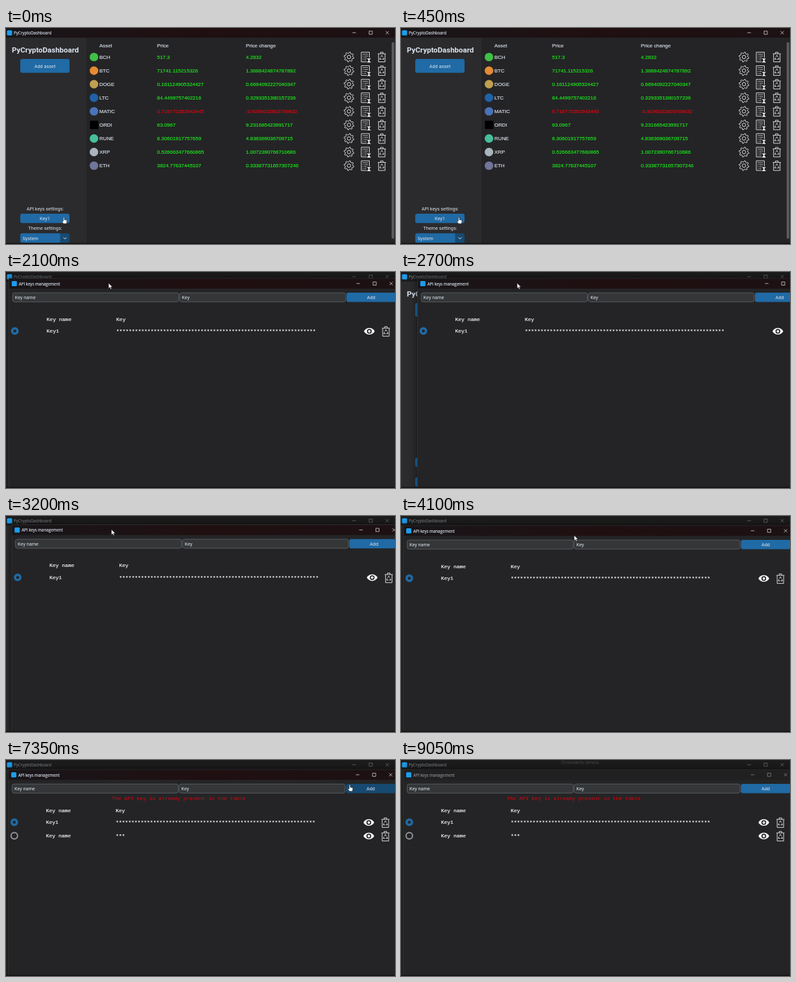
Animation, 600 px wide and 335 px high, one loop 9100 ms. Source, as an HTML page:

```html
<!DOCTYPE html>
<html lang="en">
<head>
<meta charset="utf-8">
<title>PyCryptoDashboard</title>
<style>
  html, body { margin: 0; width: 100%; height: 100%; overflow: hidden; background: #242426; }
  svg { display: block; width: 100vw; height: 100vh; }
  text { fill: #dce4ee; white-space: pre; }
  .ui { font: 7.3px Roboto, sans-serif; }
  .bar { font: 6.2px "Open Sans", sans-serif; stroke: #dce4ee; stroke-width: .15; }
  .cell { font: 7.9px "Liberation Sans", Arial, sans-serif; stroke: #dce4ee; stroke-width: .15; }
  .mono { font: 8.02px "Liberation Mono", "Courier New", monospace; fill: #fff; stroke: #fff; stroke-width: .15; }
  .cell.up { fill: #1cf01c; stroke: #1cf01c; }
  .cell.down { fill: #e8000c; stroke: #e8000c; }
  .mono.error { fill: #e4000b; stroke: none; }
  .bar.tip { fill: #4b4b4d; stroke: none; }
  .head { font: bold 11.5px Roboto, sans-serif; }
  .mid { text-anchor: middle; }
  .line { fill: none; stroke: #eee; stroke-width: .9; stroke-linejoin: round; }
  .thin { fill: none; stroke: #eee; stroke-width: .7; }
  .solid { fill: #eee; }
  .hand { fill: #fff; stroke: #222; stroke-width: .6; stroke-linejoin: round; }
</style>
</head>
<body>
<svg id="stage" viewBox="0 0 600 335" xmlns="http://www.w3.org/2000/svg"></svg>
<script>
const LOOP = 9100;
const BLUE = '#206aa5', DARK_BLUE = '#174a71';
const OPEN = 650, GRAB = 1680, HOVER_IN = 4500, ROW_ADDED = 5500,
      ERROR_AT = 6300, HOVER_OUT = 7500, BLUR = 8700, TIP = 8850;

const assets = [
  ['BCH', '517.3', '4.2832', '#3fbf45'],
  ['BTC', '71741.115215326', '1.3688424874787892', '#e58a35'],
  ['DOGE', '0.161124905324427', '0.6694092227040347', '#bfa050'],
  ['LTC', '84.4499757402216', '0.3293351380157236', '#1f62a8'],
  ['MATIC', '0.718772352943445', '-0.9296032803789832', '#4a72b8'],
  ['ORDI', '63.0967', '9.231685423991717', '#000'],
  ['RUNE', '6.30601917757659', '4.838369036709715', '#45c09a'],
  ['XRP', '0.526663477660865', '1.0072390766710686', '#a9b4bd'],
  ['ETH', '3824.77637445107', '0.33387731657307246', '#70759a'],
];

// Markup helpers; text is placed by its vertical centre.
const text = (x, y, s, cls, extra = '') =>
  `<text x="${x}" y="${y + 2.7}" class="${cls}" ${extra}>${s}</text>`;
const rect = (x, y, w, h, fill, extra = '') =>
  `<rect x="${x}" y="${y}" width="${w}" height="${h}" fill="${fill}" ${extra}/>`;
const at = (x, y, inner) => `<g transform="translate(${x} ${y})">${inner}</g>`;
const path = (d, cls) => `<path d="${d}" class="${cls}"/>`;

function gear() {
  const points = [];
  for (let i = 0; i < 32; i++) {
    const a = (i + .5) * Math.PI / 16, r = i % 4 < 2 ? 7.6 : 5.7;
    points.push((r * Math.cos(a)).toFixed(2) + ',' + (r * Math.sin(a)).toFixed(2));
  }
  return `<polygon points="${points.join(' ')}" class="line"/><circle r="2.7" class="line"/>`;
}
const list = () =>
  path('M2 7.5H-6.5V-7.5H6V1', 'line') +
  path('M-4.5 -4.5H4M-4.5 -1.5h1.3M-2 -1.5H4M-4.5 1.5h1.3M-2 1.5H2M-4.5 4.5h1.3M-2 4.5H1', 'thin') +
  path('M2.6 2.2H8V3H7.4L5.8 5.2L7.4 7.6H8V8.5H2.6V7.6H3.2L4.8 5.2L3.2 3H2.6Z', 'solid');
const trash = () =>
  path('M-5 -4.8V7.5H5V-4.8M-6.2 -5H6.2M-2 -5V-7.3H2V-5', 'line') +
  path('M-1.6 -.2L0 -2.6L1.6 -.2M2.2 1L3.3 3.5H.6M-.6 3.5H-3.3L-2.2 1', 'line');
const eye = () =>
  '<path d="M-8.3 0C-4.5 -6.8 4.5 -6.8 8.3 0C4.5 6.8 -4.5 6.8 -8.3 0Z" fill="#fff"/>' +
  '<circle r="3.7" fill="#242426"/><circle r="2" fill="#fff"/>';

const appMark = (x, y) => rect(x - 4, y - 4, 8, 8, '#1c9cec', 'rx="1.5"');
const controls = (x, y) =>
  path(`M${x - 2.7} ${y}h5.4M${x + 23} ${y - 2.5}h5v5h-5zM${x + 48.5} ${y - 2.5}l5 5m0 -5l-5 5`, 'thin');
const button = (x, y, w, h, label) =>
  rect(x, y, w, h, BLUE, 'rx="3"') + text(x + w / 2, y + h / 2, label, 'ui mid');
const entry = (x, w, label) =>
  rect(x, 37.3, w, 14, '#343638', 'rx="3" stroke="#5c6164" stroke-width=".9"') +
  text(x + 3.5, 44.2, label, 'ui');

function assetRow([name, price, change, color], i) {
  const y = 45 + 21.06 * i;
  const cls = change[0] === '-' ? 'cell down' : 'cell up';
  const mark = name === 'ORDI'
    ? rect(129.5, y - 6.5, 13, 13, color, 'rx="1"')
    : `<circle cx="135.7" cy="${y}" r="6.6" fill="${color}"/>`;
  return mark + text(144, y, name, 'cell') + text(233, y, price, cls) + text(370, y, change, cls) +
    at(529, y, gear()) + at(554.5, y, list()) + at(579.7, y, trash());
}

function keyRow(y, name, stars, selected) {
  const radio = selected
    ? `<circle cx="12.8" cy="${y}" r="4.1" fill="none" stroke="${BLUE}" stroke-width="3.6"/>`
    : `<circle cx="12.8" cy="${y}" r="5" fill="none" stroke="#949a9f" stroke-width="1.9"/>`;
  return radio + text(61.7, y - .2, name, 'mono') + text(169.2, y, '*'.repeat(stars), 'mono') +
    at(559.6, y + .4, eye()) + at(585.2, y + .6, trash());
}

const mainWindow =
  rect(0, 0, 600, 335, '#242426') +
  rect(0, 0, 600, 15, 'url(#active)', 'id="mainBar"') +
  rect(0, 15, 124, 320, '#2b2b2d') +
  appMark(5.5, 7.5) +
  `<g id="mainTitle">${text(12, 7.3, 'PyCryptoDashboard', 'bar')}${controls(537, 7.3)}</g>` +
  text(60.7, 35, 'PyCryptoDashboard', 'head mid') +
  button(22, 48, 76, 21.6, 'Add asset') +
  text(60.4, 280, 'API keys settings:', 'ui mid') +
  button(22, 288, 76, 14.5, 'Key1') +
  text(60.4, 310.7, 'Theme settings:', 'ui mid') +
  rect(22, 318.5, 76, 14.5, DARK_BLUE, 'rx="3"') +
  `<path d="M25 318.5H83.5V333H25Q22 333 22 330V321.5Q22 318.5 25 318.5Z" fill="${BLUE}"/>` +
  text(25.5, 326, 'System', 'ui') + path('M88.5 324.7l2.5 2.5l2.5 -2.5', 'line') +
  text(144, 27, 'Asset', 'cell') + text(233, 27, 'Price', 'cell') + text(370, 27, 'Price change', 'cell') +
  assets.map(assetRow).join('') +
  rect(594.8, 22, 4, 305, '#5c5c5e', 'rx="2"');

const keyWindow =
  rect(3.8, 15, 603.7, 340, '#000', 'filter="url(#shadow)" opacity=".65"') +
  rect(3.8, 15, 603.7, 340, '#242426', 'stroke="#3d3839" stroke-width=".7"') +
  rect(4.1, 15.3, 603, 15.5, 'url(#active)', 'id="keyBar"') +
  appMark(12, 23) +
  `<g id="keyTitle">${text(19, 22.9, 'API keys management', 'bar')}${controls(542.3, 22.9)}</g>` +
  entry(9.4, 256.4, 'Key name') + entry(267, 256, 'Key') +
  `<g id="add">${button(524.3, 37, 76.2, 14.6, 'Add')}</g>` +
  text(266.5, 59, 'The API key is already present in the table', 'mono mid error', 'id="error"') +
  text(61.7, 78, 'Key name', 'mono') + text(169.2, 78, 'Key', 'mono') +
  keyRow(96.5, 'Key1', 64, true) +
  `<g id="newRow">${keyRow(117.5, 'Key name', 3, false)}</g>` +
  rect(600.7, 74, 4, 290, '#5c5c5e', 'rx="2"');

const pointers =
  '<path id="arrow" d="M0 0V8.2L1.9 6.5L3.2 9.3L4.6 8.7L3.3 6H5.9Z" class="hand"/>' +
  '<path id="hand" d="M-1.7 -5.2Q-.8 -6.2 0 -5.2V-1.8L3.2 -1Q4.2 -.6 4 .6L3.3 4.6H-1.2L-3.6 1.2Q-3.6 -.1 -1.7 .8Z" class="hand"/>';

const stage = document.getElementById('stage');
stage.innerHTML = `<defs>
  <linearGradient id="active"><stop stop-color="#181619"/><stop offset=".5" stop-color="#200f11"/><stop offset="1" stop-color="#1c1113"/></linearGradient>
  <filter id="shadow" x="-10%" y="-10%" width="120%" height="120%"><feGaussianBlur stdDeviation="6"/></filter>
</defs>${mainWindow}<g id="keys">${keyWindow}</g>
${rect(0, 333.6, 600, 1.4, '#101012')}
${text(247, 3, 'Остановить запись', 'bar tip', 'id="tip"')}
<g id="pointer">${pointers}</g>`;

const $ = id => document.getElementById(id);
const show = (id, on) => $(id).setAttribute('display', on ? 'inline' : 'none');
const addFace = $('add').querySelector('rect');

// Keyframes: [time, x, y], eased between neighbours.
const windowTrack = [
  [GRAB, -64.5, -5], [1950, -6, -5], [2400, 20, -5], [2700, 21.7, -5],
  [2900, 21.7, -5], [3200, 5.2, -1.3], [3500, 0, 0],
];
const beforeDrag = [[0, 90, 299], [700, 90, 299], [1500, 98.5, 19.3], [GRAB, 98.5, 19.3]];
const afterDrag = [
  [3500, 157.4, 22.2], [3850, 157.4, 22.2], [4550, 531, 49], [5700, 531, 49],
  [6200, 531, 44], [7400, 531, 44], [7700, 520, 30], [8350, 280, 0], [8600, 278, -12],
];

function sample(track, t) {
  const next = track.findIndex(key => key[0] > t);
  if (next === 0) return track[0].slice(1);
  if (next < 0) return track[track.length - 1].slice(1);
  const [t0, x0, y0] = track[next - 1], [t1, x1, y1] = track[next];
  const u = (t - t0) / (t1 - t0), e = u * u * (3 - 2 * u);
  return [x0 + (x1 - x0) * e, y0 + (y1 - y0) * e];
}

function pointerAt(t, [wx, wy]) {
  if (t < GRAB) return sample(beforeDrag, t);
  if (t < 3500) return [157.4 + wx, 22.2 + wy];
  return sample(afterDrag, t);
}

function draw(t) {
  const opened = t >= OPEN, blurred = t >= BLUR;
  const hover = t >= HOVER_IN && t < HOVER_OUT;
  const shift = sample(windowTrack, t);
  const handShown = t < OPEN || hover;

  show('keys', opened);
  $('keys').setAttribute('transform', `translate(${shift})`);
  $('mainBar').setAttribute('fill', opened ? '#1c1c1d' : 'url(#active)');
  $('mainTitle').setAttribute('opacity', opened ? .45 : 1);
  $('keyBar').setAttribute('fill', blurred ? '#202021' : 'url(#active)');
  $('keyTitle').setAttribute('opacity', blurred ? .55 : 1);
  addFace.setAttribute('fill', hover ? DARK_BLUE : BLUE);
  show('newRow', t >= ROW_ADDED);
  show('error', t >= ERROR_AT);
  show('tip', t >= TIP);
  show('hand', handShown);
  show('arrow', !handShown);
  $('pointer').setAttribute('transform', `translate(${pointerAt(t, shift)})`);
}

const start = performance.now();
function tick() {
  draw((performance.now() - start) % LOOP);
  requestAnimationFrame(tick);
}
tick();
</script>
</body>
</html>
```
